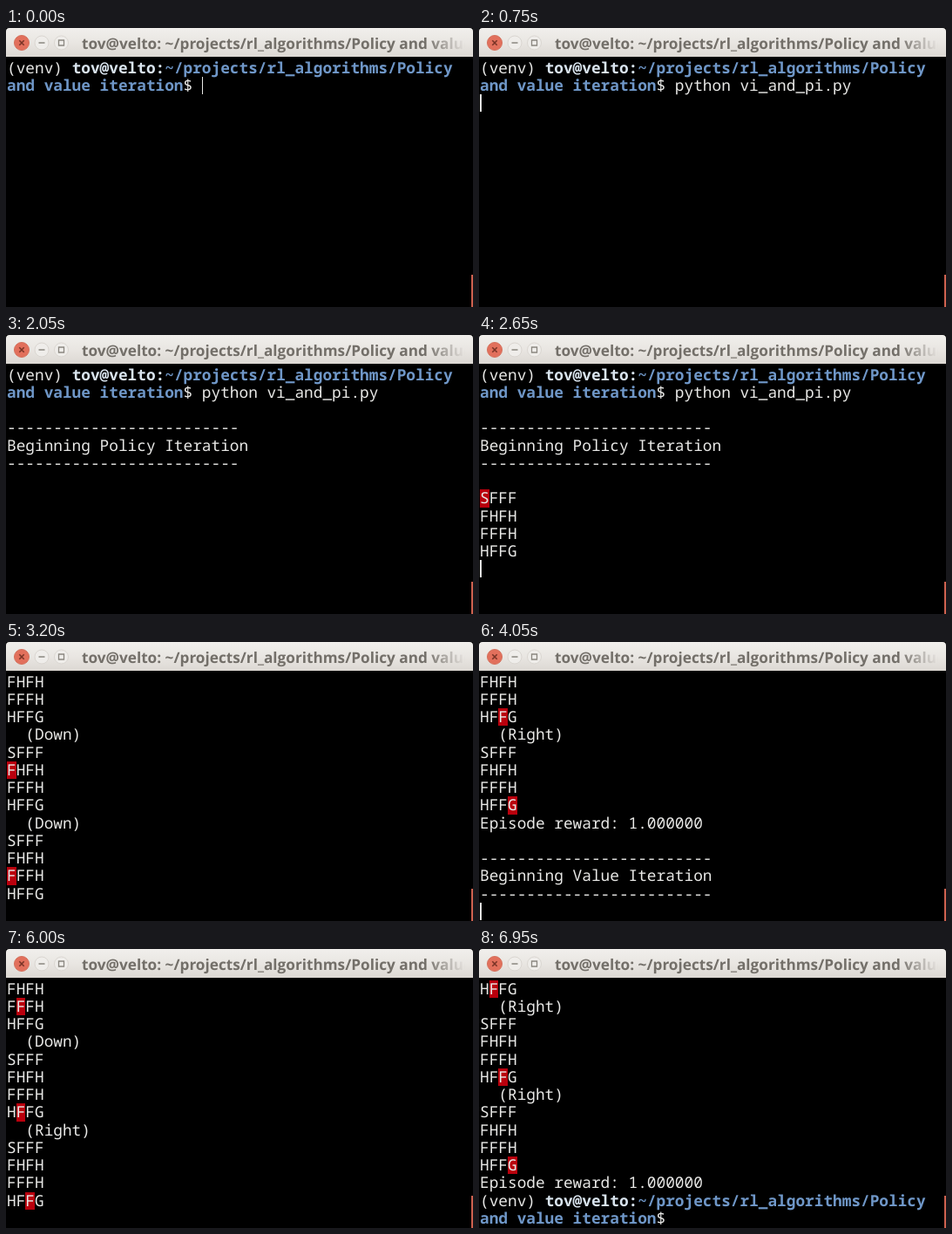
Recreate the animation shown at these times as an HTML page. Size 536 px wide and 320 px high, loop 7000 ms.

```html
<!DOCTYPE html>
<html lang="en">
<head>
<meta charset="utf-8">
<title>Terminal</title>
<style>
  html, body { margin: 0; width: 100%; height: 100%; overflow: hidden; background: #000; }
  #stage { position: relative; width: 536px; height: 320px; overflow: hidden; background: #000; text-rendering: geometricPrecision; }
  #bar {
    position: absolute; inset: 0 0 auto; height: 33px; border-radius: 4px 4px 0 0;
    background: linear-gradient(#f1efec, #e9e6e2 50%, #dcd8d3);
  }
  #bar svg { position: absolute; left: 0; top: 0; }
  #title {
    position: absolute; left: 87px; top: 7px; width: 440px; overflow: hidden; white-space: pre;
    font: bold 17.2px/24px "Open Sans", "Noto Sans", sans-serif; color: #736f69;
    -webkit-mask-image: linear-gradient(90deg, #000 395px, transparent 440px);
    mask-image: linear-gradient(90deg, #000 395px, transparent 440px);
  }
  #term {
    position: absolute; left: 1px; top: 35.5px; margin: 0; color: #e9e9e7;
    font: 500 17.78px/20.27px "Noto Sans Mono", "DejaVu Sans Mono", monospace;
    font-variant-ligatures: none;
  }
  #term div { height: 20.27px; }
  #term b { color: #d9e4ee; }
  #term .path { color: #6f97c8; }
  #term em { display: inline-block; height: 20.27px; vertical-align: top; font-style: normal; background: #b9000d; }
  #term i { display: inline-block; width: 1.5px; height: 20px; vertical-align: top; background: #e9e9e7; }
  #thumb { position: absolute; left: 534px; top: 283px; width: 2px; height: 37px; background: #cf6250; }
</style>
</head>
<body>
<div id="stage">
  <div id="bar">
    <svg width="80" height="33" fill="none">
      <circle cx="18" cy="17" r="8.5" fill="#e2705c" stroke="#d4705c"/>
      <path d="M15.3 14.3l5.4 5.4m0-5.4l-5.4 5.4" stroke="#7a3427" stroke-width="1.6"/>
      <g stroke="#dad6d1" fill="#efedea"><circle cx="41" cy="17" r="8"/><circle cx="63.5" cy="17" r="8"/></g>
      <path d="M37.5 17h7M60.5 14h6v6h-6z" stroke="#8b8780" stroke-width="1.3"/>
    </svg>
    <div id="title">tov@velto: ~/projects/rl_algorithms/Policy and value iteration</div>
  </div>
  <pre id="term"></pre>
  <div id="thumb"></div>
</div>
<script>
const LOOP = 7000, ROWS = 14, STEP = 250, ENTER = 180, BLINK = 600;
const term = document.getElementById("term");
const prompt = '(venv) <b>tov@velto:</b><b class="path">~/projects/rl_algorithms/Policy</b>\n' +
  '<b class="path">and value iteration</b>$ ';
const lake = ["SFFF", "FHFH", "FFFH", "HFFG"];
const moves = ["Down", "Down", "Right", "Down", "Right", "Right"];

const events = [];
const print = (time, text) => events.push({ time, text });

function header(time, name) {
  const rule = "-".repeat(25);
  print(time, `\n${rule}\nBeginning ${name} Iteration\n${rule}\n`);
}

function grid(x, y) {
  return lake.map((row, r) => r === y
    ? row.slice(0, x) + `<em>${row[x]}</em>` + row.slice(x + 1)
    : row).join("\n") + "\n";
}

function episode(start) {
  let x = 0, y = 0, time = start;
  print(time, "\n" + grid(x, y));
  for (const move of moves) {
    move === "Down" ? y++ : x++;
    print(time += STEP, `  (${move})\n` + grid(x, y));
  }
  print(time, "Episode reward: 1.000000\n");
  return time;
}

print(0, prompt);
print(100, "python vi_and_pi.py");
print(ENTER, "\n");
header(1900, "Policy");
header(episode(2550), "Value");
print(episode(4550) + 100, prompt);

let shown;
function frame() {
  const t = performance.now() % LOOP;
  const text = events.filter(e => e.time <= t).map(e => e.text).join("");
  const cursor = t < ENTER || (t - ENTER) % (2 * BLINK) < BLINK ? "<i></i>" : "";
  const html = (text + cursor).split("\n").slice(-ROWS).map(row => `<div>${row}</div>`).join("");
  if (html !== shown) term.innerHTML = shown = html;
  requestAnimationFrame(frame);
}
frame();
</script>
</body>
</html>
```
